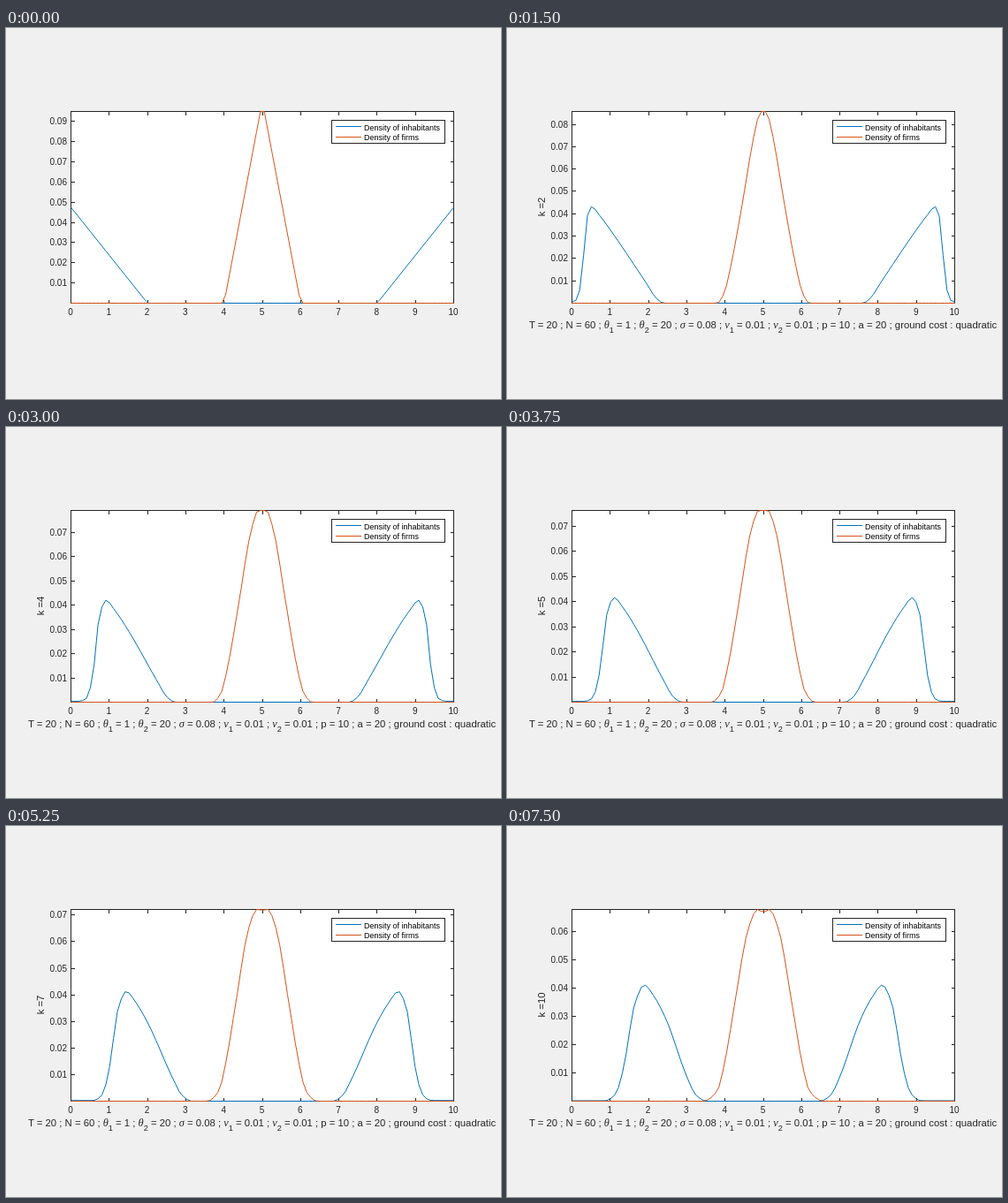
An HTML page for the animation above (8000 ms loop, 560 by 420 pixels).

```html
<!DOCTYPE html>
<html lang="en">
<head>
<meta charset="utf-8">
<title>Density chart</title>
<style>
  html, body { margin: 0; width: 100%; height: 100%; overflow: hidden; background: #f0f0f0; }
  svg { display: block; width: 560px; height: 420px; }
  text { font-family: "Liberation Sans", Arial, sans-serif; font-size: 10px; fill: #262626; white-space: pre; }
  .axis { fill: none; stroke: #262626; shape-rendering: crispEdges; }
  .curve { fill: none; stroke-linejoin: round; }
  .label { font-size: 11.33px; }
  .greek { font: italic 12.4px "Liberation Serif", Times, serif; }
  .sub { font-size: 9.2px; baseline-shift: -5px; }
  .legend text { font-size: 9px; fill: #000; }
  .mid { text-anchor: middle; }
  .end { text-anchor: end; }
</style>
</head>
<body>
<svg id="stage" viewBox="0 0 560 420"></svg>
<script>
const LEFT = 73.5, RIGHT = 506.5, TOP = 94.5, BOTTOM = 311.5;
const WIDTH = RIGHT - LEFT, HEIGHT = BOTTOM - TOP, UNIT = WIDTH / 10;
const CENTER = (LEFT + RIGHT) / 2;
const BLUE = '#0072bd', ORANGE = '#d95319';
const STEP = 750, LOOP = 8000, LAST = 10, SAMPLES = 100;

// Both densities flatten out exponentially with k.
const firmPeak = k => .0605 + .0344 * Math.exp(-.155 * k);
const peoplePeak = k => k ? .041 + .0046 * Math.exp(-.38 * k) : firmPeak(0) / 2;

// Key points: [fraction of peak, position at k = 1, position at the last k].
const peopleShape = [
  [.03, 72, 119], [.1, 74.5, 125.2], [.3, 77.6, 132.2], [.85, 81, 145], [1, 86.3, 155.3],
  [.9, 96, 166.5], [.7, 112.3, 180.2], [.2, 151, 204], [.05, 162, 214], [0, 170, 226]
];
const firmShape = [[1, 2.2, 6.7], [.9, 7.6, 17], [.5, 23, 32.7], [.2, 35.4, 43.8], [.05, 43.5, 52.5], [0, 50, 68]];

const ease = (t, bend) => t * (1 + bend - bend * t);

function shapeAt(shape, k, bend, first) {
  const t = (k - 1) / (LAST - 1);
  const points = shape.map(([level, from, to]) => [from + (to - from) * ease(t, bend(level)), level]);
  return smooth([first(points[0][0]), ...points]);
}

// Monotone cubic through [x, y] points, constant beyond the ends.
function smooth(points) {
  const xs = points.map(p => p[0]), ys = points.map(p => p[1]), last = xs.length - 1;
  const slope = i => (ys[i + 1] - ys[i]) / (xs[i + 1] - xs[i]);
  const tangent = i => {
    if (i === 0 || i === last) return 0;
    const a = slope(i - 1), b = slope(i);
    return a * b > 0 ? 2 * a * b / (a + b) : 0;
  };
  return x => {
    if (x <= xs[0]) return ys[0];
    if (x >= xs[last]) return ys[last];
    let i = 0;
    while (xs[i + 1] < x) i++;
    const w = xs[i + 1] - xs[i], t = (x - xs[i]) / w, s = 1 - t;
    return s * s * ((1 + 2 * t) * ys[i] + t * w * tangent(i))
         + t * t * ((3 - 2 * t) * ys[i + 1] - s * w * tangent(i + 1));
  };
}

function densities(k) {
  if (k === 0) return {
    people: x => Math.max(0, 1 - (x - LEFT) / (2 * UNIT)),
    firms: d => Math.max(0, 1 - d / UNIT)
  };
  const floor = .012 - .0008 * k, dip = .0035 * Math.max(0, k - 6);
  return {
    people: shapeAt(peopleShape, k, () => .24, x => [x - 8, floor]),
    firms: shapeAt(firmShape, k, level => .9 * level, () => [0, 1 - dip])
  };
}

const xs = Array.from({ length: SAMPLES }, (_, i) => LEFT + WIDTH * i / (SAMPLES - 1));

function curve(heights, scale, color) {
  const points = xs.map((x, i) => `${x.toFixed(2)},${(BOTTOM - HEIGHT * scale * heights[i]).toFixed(2)}`);
  return `<polyline class="curve" stroke="${color}" points="${points.join(' ')}"/>`;
}

function curves(k) {
  const { people, firms } = densities(k);
  const peopleHeights = xs.map(x => people(Math.min(x, LEFT + RIGHT - x)));
  const firmHeights = xs.map(x => firms(Math.abs(x - CENTER)));
  return curve(peopleHeights, peoplePeak(k) / firmPeak(k), BLUE)
       + curve(firmHeights, 1 / Math.max(...firmHeights), ORANGE);
}

const text = (x, y, str, cls = '') => `<text x="${x}" y="${y}" class="${cls}">${str}</text>`;

function axes(k) {
  let ticks = '', labels = '';
  for (let i = 0; i <= 10; i++) {
    const x = LEFT + UNIT * i;
    ticks += `M${x} ${BOTTOM}v-4M${x} ${TOP}v4`;
    labels += text(x - .5, 325, i, 'mid');
  }
  for (let v = .01; v < firmPeak(k); v += .01) {
    const y = BOTTOM - HEIGHT * v / firmPeak(k);
    ticks += `M${LEFT} ${y}h4M${RIGHT} ${y}h-4`;
    labels += text(69, y + 3.5, v.toFixed(2), 'end');
  }
  return `<rect x="${LEFT}" y="${TOP}" width="${WIDTH}" height="${HEIGHT}" fill="#fff"/>
    <path class="axis" d="M${LEFT} ${TOP}H${RIGHT}V${BOTTOM}H${LEFT}Z${ticks}"/>${labels}`;
}

const caption = 'T = 20 ; N = 60 ; θ1 = 1 ; θ2 = 20 ; σ = 0.08 ; ν1 = 0.01 ; ν2 = 0.01 ; p = 10 ; a = 20 ; ground cost : quadratic'
  .replace(/([θσν])(\d?)/g, '<tspan class="greek">$1</tspan><tspan class="sub">$2</tspan>');

function captions(k) {
  if (k === 0) return '';
  return text(289.5, 340, caption, 'label mid')
    + `<text class="label mid" transform="translate(43 202.5) rotate(-90)">k =${k}</text>`;
}

const legend = `<g class="legend">
  <rect class="axis" x="368.5" y="104.5" width="128" height="26" style="fill:#fff"/>
  <path d="M373 111.5h29" stroke="${BLUE}"/><path d="M373 123.5h29" stroke="${ORANGE}"/>
  ${text(405, 116, 'Density of inhabitants')}${text(405, 127, 'Density of firms')}</g>`;

const stage = document.getElementById('stage');
const start = performance.now();
let shown = -1;

function frame() {
  const k = Math.floor(((performance.now() - start) % LOOP) / STEP);
  if (k !== shown) {
    shown = k;
    stage.innerHTML = axes(k) + curves(k) + legend + captions(k);
  }
  requestAnimationFrame(frame);
}
frame();
</script>
</body>
</html>
```
